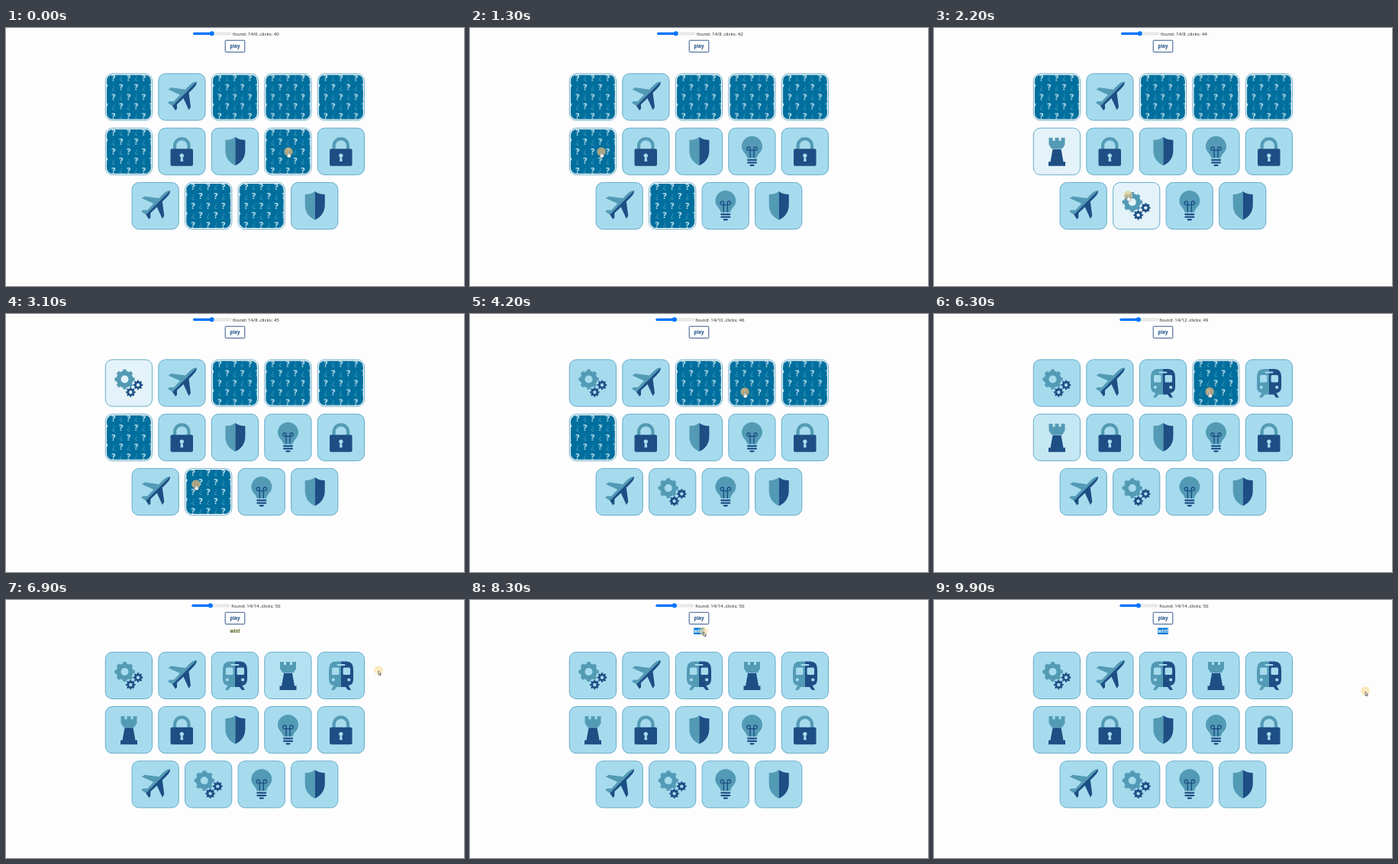
These frames come from a looping animation (600x338 px, 10 s). An HTML page:

```html
<!DOCTYPE html>
<html lang="en">
<head>
<meta charset="utf-8">
<title>Memory game</title>
<style>
  html, body { margin: 0; width: 100%; height: 100%; overflow: hidden; background: #fdfdfe; }
  svg { display: block; width: 100vw; height: 100vh; font-family: "Open Sans", "Noto Sans", sans-serif; }
  .t { fill: #539ab5; }
  .n { fill: #1d4f85; }
  .h { fill: currentColor; }
  .ring { fill: none; stroke: #539ab5; }
  .ring.d { stroke: #1d4f85; }
</style>
</head>
<body>
<svg viewBox="0 0 600 338" xmlns="http://www.w3.org/2000/svg">
  <defs>
    <pattern id="marks" x="6" width="19.8" height="25" patternUnits="userSpaceOnUse">
      <rect width="19.8" height="25" fill="#006f9e"/>
      <g text-anchor="middle" font-size="11" font-weight="700" fill="#d5eef7">
        <text x="4.950" y="9.500">?</text><text x="14.850" y="22">?</text>
      </g>
      <g text-anchor="middle" font-size="9.500" fill="#58a5c4">
        <text x="14.850" y="8">¿</text><text x="4.950" y="20.500">¿</text>
      </g>
    </pattern>

    <g id="plane">
      <path id="half" class="t" d="M50 11C47.500 10 44 12.500 41 15.500L35.500 21 17 18.500 13 21 28.500 28 20.500 36.500 14.500 36.500 12.500 38.500 18.500 42.500Z"/>
      <path class="n" transform="matrix(0 -1 -1 0 61 61)" d="M50 11C47.500 10 44 12.500 41 15.500L35.500 21 17 18.500 13 21 28.500 28 20.500 36.500 14.500 36.500 12.500 38.500 18.500 42.500Z"/>
    </g>
    <g id="lock">
      <path class="ring" stroke-width="4.200" d="M21.600 28v-4.500a9.200 9.200 0 0 1 18.400 0V28"/>
      <rect class="n" x="16" y="27.500" width="29.500" height="22.500" rx="2"/>
      <circle class="h" cx="30.800" cy="36.300" r="2.700"/>
      <path class="h" d="M29.800 37h2l1 7h-4z"/>
    </g>
    <g id="shield" transform="translate(.4)">
      <path class="t" d="M31 12C27 15 22 16 18 16V30C18 40 24 46 31 49.500Z"/>
      <path class="n" d="M31 12C35 15 40 16 44 16V30C44 40 38 46 31 49.500Z"/>
    </g>
    <g id="bulb">
      <path class="t" d="M24.500 39.500C24.500 34 17.500 32 17.500 24.500a13.500 13.500 0 0 1 27 0C44.500 32 37.500 34 37.500 39.500Z"/>
      <path class="ring d" stroke-width="1.400" d="M28.500 39.500V29.500H26.500a2.300 2.300 0 1 1 2-3.500V29.500H33.500V26a2.300 2.300 0 1 1 2 3.500H33.500V39.500"/>
      <path class="ring d" stroke-width="2.200" stroke-linecap="round" d="M25.500 42H36.500M25.500 45.500H36.500M29 49H33"/>
    </g>
    <g id="gears">
      <circle class="ring" cx="25.500" cy="26" r="8" stroke-width="6"/>
      <circle class="ring" cx="25.500" cy="26" r="11.600" stroke-width="3" pathLength="16" stroke-dasharray="1" stroke-dashoffset=".5"/>
      <g id="cog">
        <circle class="ring d" cx="43" cy="33.500" r="3.600" stroke-width="2.800"/>
        <circle class="ring d" cx="43" cy="33.500" r="5.400" stroke-width="1.800" pathLength="16" stroke-dasharray="1" stroke-dashoffset=".5"/>
      </g>
      <use href="#cog" x="-9.700" y="9.500"/>
    </g>
    <g id="train">
      <path class="t" d="M31 12.500H24Q15 12.500 15 23V36Q15 43 21.500 44L18 50H22L25 46H31Z"/>
      <path class="n" d="M31 12.500H38Q47 12.500 47 23V36Q47 43 40.500 44L44 50H40L37 46H31Z"/>
      <g class="h">
        <rect x="25.500" y="16" width="11" height="2" rx="1"/>
        <rect x="19" y="20.500" width="9.500" height="9.500" rx="1.500"/>
        <rect x="33.500" y="20.500" width="9.500" height="9.500" rx="1.500"/>
        <circle cx="20.800" cy="36.500" r="2.100"/><circle cx="41.200" cy="36.500" r="2.100"/>
      </g>
    </g>
    <g id="rook">
      <path class="t" d="M20.500 13h5v4h3v-4h5v4h3v-4h5v9l-3.500 5.500H24l-3.500-5.500z"/>
      <path class="n" d="M25.500 28H36.500L39.500 44.500H42V50H20V44.500H22.500Z"/>
    </g>
  </defs>

  <rect width="600" height="338" fill="#fdfdfe"/>
  <g id="bar">
    <rect x="245.300" y="5.900" width="49.500" height="2.900" rx="1.450" fill="#efefef" stroke="#c4c4c4" stroke-width=".5"/>
    <rect x="245" y="5.700" width="25" height="3.200" rx="1.600" fill="#0075ff"/>
    <circle cx="269.600" cy="7.300" r="3" fill="#0075ff"/>
    <text id="score" x="297" y="10.200" font-size="6.050" fill="#1c1c1c"></text>
  </g>
  <rect x="287.200" y="16.200" width="25.600" height="15.400" rx="1" fill="#fff" stroke="#35598c"/>
  <text x="300" y="26.200" font-size="6.200" font-weight="700" text-anchor="middle" fill="#1d4f85">play</text>
  <g id="win">
    <rect id="mark" x="293.300" y="36.500" width="13.400" height="8.500" fill="#0078d7"/>
    <text id="winText" x="300" y="43" font-size="6.200" font-weight="700" text-anchor="middle">win!</text>
  </g>
  <g id="board"></g>
  <g id="cursor">
    <circle id="halo" cy="-1" r="5.800"/>
    <path id="arrow" d="M0 0V5.200L1.200 4.200 2 6 2.900 5.600 2.100 3.800H3.600Z" fill="#fff" stroke="#222" stroke-width=".6"/>
    <path id="hand" d="M-.8 0Q0-1 .8 0V2L3.200 2.700V5L2.400 6.800H-.8L-2.400 4-1.900 3.200-.8 4Z" fill="#fff" stroke="#345" stroke-width=".4"/>
  </g>
</svg>
<script>
const $ = id => document.getElementById(id);
const LOOP = 10000, FADE = 600, WIN = 6700, SELECT = 8200;
const LIGHT = [227, 243, 249], BLUE = [166, 219, 238];

// icon, time turned over, time its tint begins to settle
const deck = [
  ["gears", 2900, 3500], ["plane"], ["train", 4700, 5400], ["rook", 6400, 6440], ["train", 5200, 5200],
  ["rook", 5900, 6000], ["lock"], ["shield"], ["bulb", 200, 300], ["lock"],
  ["plane"], ["gears", 3600, 3600], ["bulb", 700, 700], ["shield"]
];
// a wrong pair, shown briefly: card, from, to
const misses = [[5, 1400, 2600], [11, 2000, 2600]];
const clicks = [200, 700, 1400, 2000, 2900, 3600, 4700, 5200, 5900, 6400];
const pairs = [700, 3600, 5200, WIN];

// cursor stops: time, x, y
const path = [
  [0, 370, 163], [200, 370, 163], [600, 335, 232], [800, 335, 232], [1300, 172, 163], [1450, 172, 163],
  [1900, 262, 230], [2100, 262, 230], [2700, 158, 95], [2900, 158, 95], [3100, 249, 224], [3600, 249, 224],
  [4200, 360, 103], [4600, 300, 95], [4800, 300, 95], [5100, 430, 98], [5200, 430, 98], [5400, 366, 107],
  [5800, 165, 165], [5950, 165, 165], [6350, 370, 100], [6500, 370, 100], [6900, 488, 93], [7100, 518, 90],
  [7700, 306, 42], [8800, 306, 42], [9900, 565, 120], [LOOP, 565, 120]
];

const cards = deck.map(([icon], i) => {
  const row = Math.floor(i / 5);
  const x = (row < 2 ? 130 : 164.8) + (i % 5) * 69.5, y = 59.5 + row * 71.3;
  const g = document.createElementNS("http://www.w3.org/2000/svg", "g");
  g.setAttribute("transform", `translate(${x} ${y})`);
  g.innerHTML = `
    <g><rect x=".3" y=".3" width="61.200" height="61.200" rx="9" fill="currentColor" stroke="#5ba4c2" stroke-width=".9"/>
      <use href="#${icon}"/></g>
    <g><rect x=".3" y=".3" width="61.200" height="61.200" rx="9" fill="#fff" stroke="#63a6c2" stroke-width=".9"/>
      <rect x="1.900" y="1.900" width="58" height="58" rx="7.500" fill="url(#marks)"/></g>`;
  $("board").append(g);
  return { x, y, g, front: g.children[0], back: g.children[1] };
});

const clamp = v => Math.min(1, Math.max(0, v));
const count = (times, t) => times.filter(s => t >= s).length;
const show = (el, on) => el.style.display = on ? "" : "none";
const mix = k => `rgb(${LIGHT.map((v, i) => Math.round(v + (BLUE[i] - v) * k))})`;

function cursorAt(t) {
  const i = path.findIndex(p => p[0] > t);
  const [t0, x0, y0] = path[i - 1], [t1, x1, y1] = path[i];
  const u = (t - t0) / (t1 - t0), k = u * u * (3 - 2 * u);
  return [x0 + (x1 - x0) * k, y0 + (y1 - y0) * k];
}

function draw(t) {
  const won = t >= WIN, shift = won ? 8.5 : 0;
  const found = 6 + 2 * count(pairs, t);
  $("score").textContent = `found: 14/${found} ,clicks: ${40 + count(clicks, t)}`;
  $("bar").setAttribute("transform", `translate(${found > 9 ? -1.7 : 0})`);

  show($("win"), won);
  show($("mark"), t >= SELECT);
  $("winText").setAttribute("fill", t >= SELECT ? "#fff" : "#4d5c14");
  $("board").setAttribute("transform", `translate(0 ${shift})`);

  const [x, y] = cursorAt(t);
  let face = null;
  cards.forEach((c, i) => {
    const [, open = -1, settle = -FADE] = deck[i];
    const miss = misses.some(([n, a, b]) => n === i && t >= a && t < b);
    const up = t >= open || miss;
    show(c.front, up);
    show(c.back, !up);
    c.g.style.color = mix(clamp((t - settle) / FADE));
    const dx = x - c.x, dy = y - c.y - shift;
    if (dx > 0 && dx < 62 && dy > 0 && dy < 62) face = up ? "front" : "back";
  });

  $("cursor").setAttribute("transform", `translate(${x} ${y})`);
  $("halo").setAttribute("fill", face === "back" ? "#d8b27ac8" : face ? "#e3c98ab0" : "#f8dc8a90");
  show($("hand"), face);
  show($("arrow"), !face);
}

function tick() {
  draw(Math.floor(performance.now() % LOOP / 100) * 100);
  requestAnimationFrame(tick);
}
tick();
</script>
</body>
</html>
```
